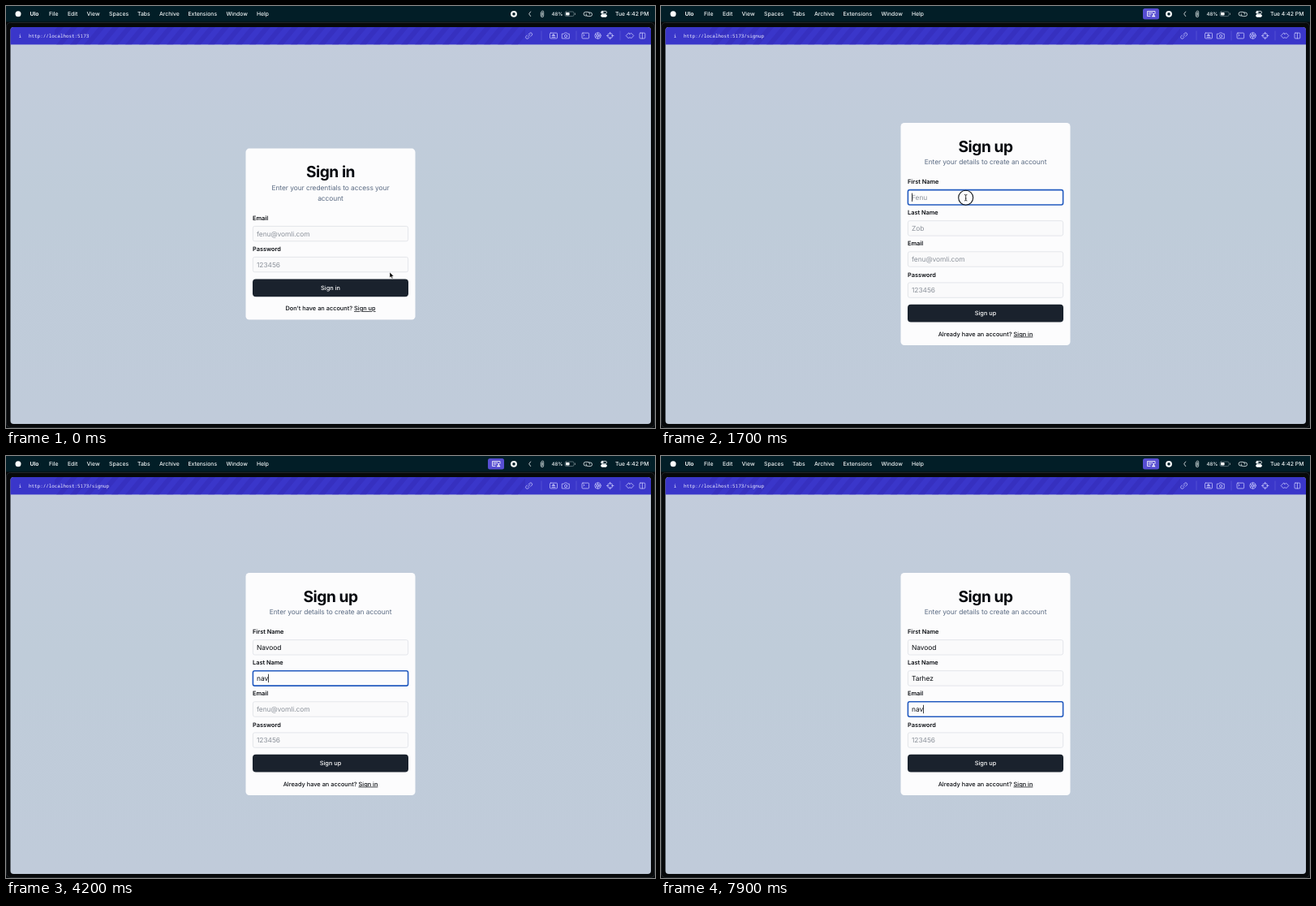
Animation, 800 px wide and 520 px high, one loop 8 s. Source, as an HTML page:

```html
<!DOCTYPE html>
<html lang="en">
<head>
<meta charset="utf-8">
<title>Sign up form</title>
<style>
html, body { margin: 0; width: 100%; height: 100%; overflow: hidden; background: #05080a; }
svg { display: block; width: 800px; height: 520px; font-family: Inter, "Noto Sans", sans-serif; text-rendering: geometricPrecision; }
text { white-space: pre; }
.menu { font-size: 6.8px; font-weight: 500; fill: #f4f7f8; }
.url { font: 5.9px "Noto Sans Mono", "DejaVu Sans Mono", monospace; fill: #eeeeff; }
.title { font-size: 19.2px; font-weight: 700; letter-spacing: -.025em; fill: #06090f; }
.sub, .value { font-size: 8.42px; letter-spacing: -.008em; }
.sub { fill: #5b6b83; }
.value { fill: #0a0d12; }
.value.empty { fill: #8c929b; }
.small { font-size: 7.37px; font-weight: 500; fill: #0a0d12; }
.label { font-weight: 600; }
.mid { text-anchor: middle; }
.link { text-decoration: underline; }
.box { fill: #fafafb; stroke: #e1e4e9; stroke-width: .9; }
.box.focus { fill: #fcfcfd; stroke: #235bc0; stroke-width: 1.6; }
.icons { fill: none; stroke-width: .8; stroke-linecap: round; stroke-linejoin: round; }
</style>
</head>
<body>
<svg viewBox="0 0 800 520">
  <defs>
    <linearGradient id="page" x1="0" y1="0" x2="0" y2="1">
      <stop offset="0" stop-color="#c3ccdc"/><stop offset=".45" stop-color="#bfccd9"/><stop offset="1" stop-color="#c0cbda"/>
    </linearGradient>
    <pattern id="stripes" width="17" height="22" patternUnits="userSpaceOnUse" patternTransform="skewX(-40)">
      <rect width="8" height="22" fill="#3029b4" opacity=".45"/>
    </pattern>
  </defs>

  <rect width="800" height="520" fill="#05080a"/>
  <rect width="800" height="19.5" fill="#021e27"/>
  <rect x=".5" y="20.5" width="799" height="499" rx="5" fill="#07090b" stroke="#20262a"/>
  <rect x="5.5" y="26" width="789.5" height="489" rx="4" fill="url(#page)"/>
  <path d="M5.5 47.5V30a4 4 0 0 1 4-4H791a4 4 0 0 1 4 4v17.5z" fill="#3a36ca"/>
  <rect x="60" y="26" width="580" height="21.5" fill="url(#stripes)"/>

  <circle cx="15" cy="9.8" r="3.5" fill="#fff"/>
  <g id="menu" class="menu"></g>
  <g id="badge">
    <rect x="594" y="3" width="20" height="13.5" rx="2.5" fill="#574ed2"/>
    <g class="icons" stroke="#fff">
      <path d="M603 12.5h-3.5v-6h9.5v3M601 8.3h5M601 10.2h3"/>
      <path d="M605 13.2a2.2 2 0 0 1 4.4 0zM606.3 10a.9.9 0 1 0 1.8 0a.9.9 0 1 0-1.8 0" fill="#fff" stroke="none"/>
    </g>
  </g>
  <g class="icons" stroke="#f0f4f5">
    <circle cx="626" cy="9.8" r="3.9" fill="#fff" stroke="none"/>
    <rect x="624.4" y="8.2" width="3.2" height="3.2" rx=".7" fill="#021e27" stroke="none"/>
    <path d="M646.7 7l-2 2.8 2 2.8"/>
    <path d="M659.3 8v4a1.7 1.7 0 0 0 3.4 0V7.3a1.3 1.3 0 0 0-2.6 0v4.2a.7.7 0 0 0 1.4 0V8" stroke-width=".65"/>
    <rect x="689" y="7" width="11" height="5.6" rx="1.6" stroke="#8b999e" stroke-width=".6"/>
    <rect x="690" y="8" width="4.6" height="3.6" rx=".8" fill="#fff" stroke="none"/>
    <path d="M701.5 9v1.6" stroke="#8b999e"/>
    <path d="M716 12h-1.6a2.3 2.3 0 0 1 0-4.6h2.8a2.3 2.3 0 0 1 2.2 2.8M718.600 8h1.600a2.300 2.300 0 0 1 0 4.600h-2.800a2.300 2.300 0 0 1-2.200-2.800"/>
    <rect x="733.500" y="6.400" width="7" height="2.900" rx="1.450"/>
    <rect x="733.500" y="10.500" width="7" height="2.900" rx="1.450" fill="#fff"/>
    <circle cx="735" cy="7.850" r="1" fill="#fff"/>
  </g>

  <text class="url" x="15.500" y="38.800" font-weight="700">i</text>
  <text class="url" id="url" x="28" y="38.800"></text>
  <g class="icons" stroke="#c5c4fa">
    <path d="M660 31v11M703 31v11M757 31v11" stroke="#5a56d6"/>
    <path d="M643.500 37.800l2.600-2.600M644.300 34.700l1.200-1.200a1.800 1.800 0 0 1 2.600 2.600l-1.300 1.300M645 38.600l-1.200 1.200a1.800 1.800 0 0 1-2.600-2.600l1.300-1.300"/>
    <rect x="670.500" y="33.200" width="9" height="6.800" rx="1"/>
    <path d="M673 38.500h4M673.300 36.700h3.400l-1.700-1.900z" fill="#c5c4fa"/>
    <path d="M685.700 34.300h2l.9-1.200h2.800l.9 1.200h2v5.700h-8.600z"/><circle cx="690" cy="37" r="1.600"/>
    <rect x="710" y="33.200" width="8.600" height="6.800" rx="1"/><path d="M711.800 35l1.300 1-1.300 1"/>
    <circle cx="729.500" cy="36.600" r="3.700"/><circle cx="729.500" cy="36.600" r="1.400"/>
    <path d="M729.500 33v2.200M732.600 34.800l-1.900 1.100M732.600 38.400l-1.900-1.100M729.500 40.200V38M726.400 38.400l1.900-1.100M726.400 34.800l1.900 1.100"/>
    <circle cx="744.700" cy="36.600" r="3.100"/><path d="M744.700 32.300v2.500M744.700 38.400v2.500M740.400 36.600h2.500M746.500 36.600h2.500"/>
    <path d="M767.500 33.200l-3.300 3.400 3.300 3.400 1.500-1.600 1.500 1.600 3.300-3.400-3.300-3.400-1.500 1.600z"/>
    <rect x="781" y="33.200" width="6.800" height="6.800" rx="1"/><path d="M784.400 33.200v6.800"/>
  </g>

  <g id="signin"></g>
  <g id="signup"></g>
  <rect id="caret" width=".8" height="10.400" fill="#0a0d12"/>

  <circle id="ring" fill="#fff" fill-opacity=".4" stroke="#14181c" stroke-width="1.100"/>
  <g id="pointer" stroke-linejoin="round">
    <path id="arrow" d="M0 0v7l1.600-1.500 1.100 2.500 1.200-.5-1.100-2.400h2.200z" fill="#000" stroke="#fff" stroke-width=".5"/>
    <path id="hand" d="M-.9 4.500V.3a.7.700 0 0 1 1.400 0V3l3 .6q.8.300.7 1.200l-.5 2.800-.6 1.200H-.4L-2.900 5.700q-.3-.9.700-.9z" fill="#fff" stroke="#000" stroke-width=".6"/>
    <path id="beam" d="M-1.700-3.800Q0-3.800 0-2.600Q0-3.800 1.700-3.800M0-2.600V2.600M-1.700 3.800Q0 3.800 0 2.600Q0 3.800 1.700 3.800M-.8.900H.8" fill="none" stroke="#111" stroke-width=".8"/>
  </g>
</svg>

<script>
const $ = id => document.getElementById(id);
const LOOP = 8000;

const menu = [[29.5, 'Ulo'], [53, 'File'], [76, 'Edit'], [99.5, 'View'], [127, 'Spaces'], [162, 'Tabs'],
  [189, 'Archive'], [224.5, 'Extensions'], [271.5, 'Window'], [309, 'Help'], [672.5, '48%'], [751, 'Tue 4:42 PM']];
$('menu').innerHTML = menu.map(([x, s], i) =>
  `<text x="${x}" y="12.2"${i ? '' : ' font-weight="700"'}${s == '48%' ? ' font-size="6.1"' : ''}>${s}</text>`).join('');

const text = (cls, x, y, s) => `<text class="${cls}" x="${x}" y="${y}">${s}</text>`;

const field = (y, label, hint) => text('small label', 304, y - 16.6, label) +
  `<rect class="box" x="304.4" y="${y - 9.2}" width="191.2" height="18.4" rx="2.2"/>` +
  text('value empty', 309, y + 3, hint);

function card({ top, height, title, sub, fields, ask, link }) {
  const end = top + height;
  return `<rect x="295.5" y="${top}" width="209" height="${height}" rx="4.4" fill="#fcfcfd"/>` +
    text('title mid', 400, top + 35.6, title) +
    sub.map((s, i) => text('sub mid', 400, top + 51.2 + i * 13, s)).join('') +
    fields.map(f => field(...f)).join('') +
    `<rect x="304" y="${end - 50.2}" width="192" height="21.8" rx="4" fill="#1a222d"/>` +
    `<text class="small mid" x="400" y="${end - 36.6}" style="fill:#fff">${title}</text>` +
    text('small mid', 400, end - 11.4, `${ask} <tspan class="link">${link}</tspan>`);
}

const email = 'fenu@vomli.com';
$('signin').innerHTML = card({
  top: 175.6, height: 211, title: 'Sign in', sub: ['Enter your credentials to access your', 'account'],
  fields: [[280.6, 'Email', email], [318.6, 'Password', '123456']],
  ask: "Don't have an account?", link: 'Sign up'
});
const hints = ['Fenu', 'Zob', email, '123456'];
const rows = [235.8, 273.9, 312, 350.1];
$('signup').innerHTML = card({
  top: 144, height: 274, title: 'Sign up', sub: ['Enter your details to create an account'],
  fields: ['First Name', 'Last Name', 'Email', 'Password'].map((s, i) => [rows[i], s, hints[i]]),
  ask: 'Already have an account?', link: 'Sign in'
});
const values = [...$('signup').querySelectorAll('.value')];
const boxes = [...$('signup').querySelectorAll('.box')];

// Key press times
const steps = (start, gap, n) => Array.from({ length: n }, (_, i) => start + i * gap);
const firstKeys = [2380, 2480, 2580, 2780, 2930, 3080];
const wrongKeys = steps(3870, 155, 6);
const eraseKeys = steps(5070, 100, 6);
const lastKeys = steps(6070, 160, 6);
const mailKeys = [7480, 7680, 7860];
const focusAt = [1560, 3580, 7170];
const events = [firstKeys, wrongKeys, eraseKeys, lastKeys, mailKeys, focusAt].flat();

const count = (times, t) => times.filter(k => k <= t).length;
const typed = (word, keys, t) => word.slice(0, count(keys, t));
const wrong = t => 'navood'.slice(0, Math.max(0, count(wrongKeys, t) - count(eraseKeys, t)));

const show = (id, on) => $(id).style.display = on ? '' : 'none';

// Pointer stops: time, x, y
const stops = [[0, 473, 328], [100, 473, 328], [720, 449, 375], [1050, 449, 375], [1500, 375.7, 236.2], [LOOP, 375.7, 236.2]];
function pointerAt(t) {
  const i = stops.findIndex(s => s[0] > t);
  const [t0, x0, y0] = stops[i - 1], [t1, x1, y1] = stops[i];
  const p = (t - t0) / (t1 - t0), e = p * p * (3 - 2 * p);
  return [x0 + (x1 - x0) * e, y0 + (y1 - y0) * e];
}

function drawPointer(t, signup) {
  const [x, y] = pointerAt(t);
  const overField = (signup ? rows : [280.6, 318.6]).some(r => Math.abs(y - r) < 9);
  const overLink = !signup && y > 367;
  show('pointer', t < 2380);
  show('hand', overLink);
  show('beam', !overLink && overField);
  show('arrow', !overLink && !overField);
  $('pointer').setAttribute('transform', `translate(${x} ${y})`);

  const press = [800, 1535].map(c => t - c).find(d => d >= 0 && d < 260);
  show('ring', press !== undefined);
  if (press !== undefined) {
    $('ring').setAttribute('cx', x);
    $('ring').setAttribute('cy', y);
    $('ring').setAttribute('r', Math.max(9, 28 - press * .115));
  }
}

function drawForm(t) {
  const content = [typed('Navood', firstKeys, t), wrong(t) || typed('Tarhez', lastKeys, t), typed('nav', mailKeys, t), ''];
  const focus = count(focusAt, t) - 1;
  content.forEach((s, i) => {
    values[i].textContent = s || hints[i];
    values[i].classList.toggle('empty', !s);
    boxes[i].classList.toggle('focus', i == focus);
  });
  const idle = t - Math.max(...events.filter(k => k <= t));
  const visible = focus >= 0 && idle % 1000 < 500;
  show('caret', visible);
  if (visible) {
    const w = content[focus] ? values[focus].getComputedTextLength() : 0;
    $('caret').setAttribute('x', 309 + w);
    $('caret').setAttribute('y', rows[focus] - 5.2);
  }
}

function draw() {
  const t = performance.now() % LOOP;
  const signup = t >= 1150;
  show('signin', !signup);
  show('signup', signup);
  show('badge', t >= 1250);
  $('url').textContent = 'http://localhost:5173' + (signup ? '/signup' : '');
  drawForm(t);
  drawPointer(t, signup);
  requestAnimationFrame(draw);
}
draw();
</script>
</body>
</html>
```
